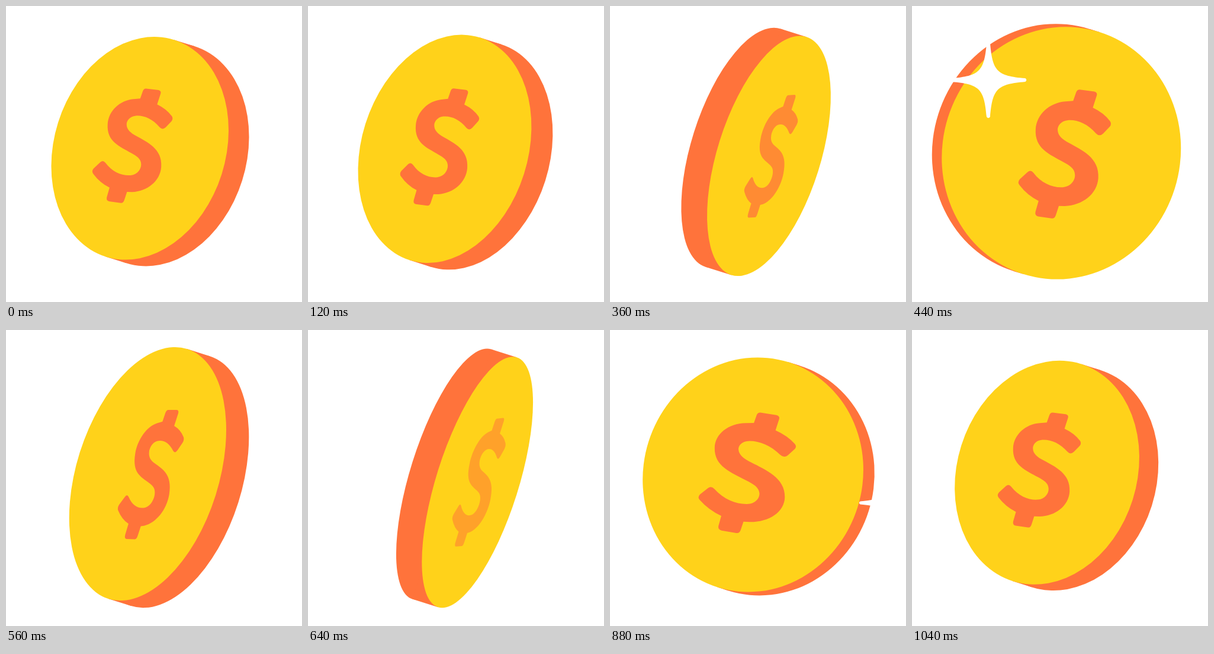
These frames come from a looping animation (500x500 px, 1080 ms). An HTML page:

```html
<!DOCTYPE html>
<html lang="en">
<head>
<meta charset="utf-8">
<title>Spinning coin</title>
<style>
  html, body { margin: 0; width: 100%; height: 100%; overflow: hidden; background: #fff; }
  svg { display: block; width: 100vw; height: 100vh; }
  .rim, #dollar { fill: #ff733b; }
  #face { fill: #ffd21a; }
  .star { fill: #fff; }
</style>
</head>
<body>
<svg viewBox="0 0 500 500">
  <g id="coin">
    <ellipse id="back" class="rim"/>
    <rect id="edge" class="rim"/>
    <ellipse id="face"/>
  </g>
  <path id="dollar" d="M266,158 L271,144 Q273,139.5 278,140 L308,145 Q315,147 313.5,152 L307,172
    Q330,182 344,197 Q348,202 344,206 L331,217 Q324,222 317,216 C298,198 276,190 258,190
    C243,190 237,199 238,205 C239,215 250,222 262,228 C290,242 327,257 327,291
    C327,318 298,335 262,334 L250,333 L245,348 Q243,354 237,353 L209,348 Q202,346 203,340
    L208,322 Q184,311 167,293 Q162,288 167,283 L182,272 Q188,268 194,274
    C212,293 236,302 256,302 C272,302 280,292 279,283 C278,272 266,266 254,260
    C225,245 193,234 193,201 C193,176 218,158 250,158 Z"/>
  <g id="stars"></g>
</svg>
<script>
  const LOOP = 1080, STEP = 40;
  const TILT = 17.5;
  const SIGN_RADIUS = 207.7;  // coin radius at which the sign has its natural size
  const BACK_WIDTH = 0.84;    // the sign on the reverse is narrower
  const FADE = 80;

  const start = performance.now();
  const $ = id => document.getElementById(id);
  const clamp = v => Math.max(0, Math.min(1, v));
  const set = (el, attrs) => {
    for (const k in attrs) el.setAttribute(k, attrs[k]);
  };

  // Key poses of the spin: time, turn in degrees, radius, centre x
  const keys = [
    [0, 41, 192, 243.5],
    [240, 61.1, 205, 254],
    [440, 159.5, 214.3, 244],
    [640, 288.3, 221.2, 264.5],
    [760, 354, 207.7, 252],
    [880, 381.8, 199.3, 251]
  ];
  const PER_LOOP = [LOOP, 360, 0, 0];

  // Key i, continuing into the neighbouring loops
  function keyAt(i) {
    const n = keys.length, lap = Math.floor(i / n);
    return keys[i - lap * n].map((v, k) => v + lap * PER_LOOP[k]);
  }

  function slope(i, k) {
    const [p, q, r] = [i - 1, i, i + 1].map(keyAt);
    const h0 = q[0] - p[0], h1 = r[0] - q[0];
    return (h1 * (q[k] - p[k]) / h0 + h0 * (r[k] - q[k]) / h1) / (h0 + h1);
  }

  // Smooth curve through the keys
  function pose(t) {
    const i = keys.findLastIndex(key => key[0] <= t);
    const p = keyAt(i), q = keyAt(i + 1), h = q[0] - p[0];
    const s = (t - p[0]) / h, ease = s * s * (3 - 2 * s);
    return [1, 2, 3].map(k => p[k] + (q[k] - p[k]) * ease +
      h * s * (1 - s) * (slope(i, k) * (1 - s) - slope(i + 1, k) * s));
  }

  const stars = [
    { x: 129, y: 125, r: 66, from: 320, to: 600 },
    { x: 380, y: 415, r: 49, from: 600, to: 860 },
    { x: 475, y: 292, r: 55, from: 680, to: 1040 }
  ];
  for (const star of stars) {
    star.el = document.createElementNS("http://www.w3.org/2000/svg", "path");
    set(star.el, {
      class: "star",
      d: "M3,-63 C7,-15 15,-7 63,-3 Q67,0 63,3 C15,7 7,15 3,63 Q0,67 -3,63 " +
         "C-7,15 -15,7 -63,3 Q-67,0 -63,-3 C-15,-7 -7,-15 -3,-63 Q0,-67 3,-63 Z"
    });
    $("stars").append(star.el);
  }

  function drawCoin(t) {
    const [turn, r, x] = pose(t);
    const y = 192.2 + 0.22 * x;
    const angle = turn * Math.PI / 180;
    const heads = Math.cos(angle) >= 0;
    const open = Math.abs(Math.cos(angle));
    // The coin gets thinner as it grows
    const half = 5300 / r * Math.sin(angle);
    const faceX = heads ? -half : half;
    const size = { cy: 0, rx: r * open, ry: r };
    const place = `translate(${x} ${y}) rotate(${TILT})`;

    set($("coin"), { transform: place });
    set($("back"), { cx: -faceX, ...size });
    set($("face"), { cx: faceX, ...size });
    set($("edge"), { x: -Math.abs(half), y: -r, width: 2 * Math.abs(half), height: 2 * r });

    // The sign sways a little on its face
    const phase = 2 * Math.PI * t / LOOP;
    const sway = -4 - 9.5 * Math.cos(phase) + 3 * Math.sin(phase);
    const scale = r / SIGN_RADIUS;
    const sx = scale * open * (heads ? 1 : BACK_WIDTH);
    const sy = scale * (0.96 + 0.04 * open);
    // It fades in each time a new face comes round
    const shownFrom = t < 300 ? -FADE : t < 600 ? 300 : 600;
    set($("dollar"), {
      transform: `${place} translate(${faceX + sway} 0) scale(${sx} ${sy}) ` +
        `rotate(${-TILT}) translate(-255 -246.5)`,
      opacity: clamp((t - shownFrom) / FADE)
    });
  }

  function drawStar({ el, x, y, r, from, to }, t) {
    const life = clamp((t - from) / (to - from));
    set(el, {
      transform: `translate(${x} ${y}) scale(${r / 65 * Math.sin(Math.PI * life)})`,
      visibility: life > 0 && life < 1 ? "visible" : "hidden"
    });
  }

  function draw(t) {
    drawCoin(t);
    stars.forEach(star => drawStar(star, t));
  }

  function tick() {
    const t = performance.now() - start;
    draw(Math.floor(t / STEP + 0.1) * STEP % LOOP);
    requestAnimationFrame(tick);
  }
  draw(0);
  requestAnimationFrame(tick);
</script>
</body>
</html>
```
